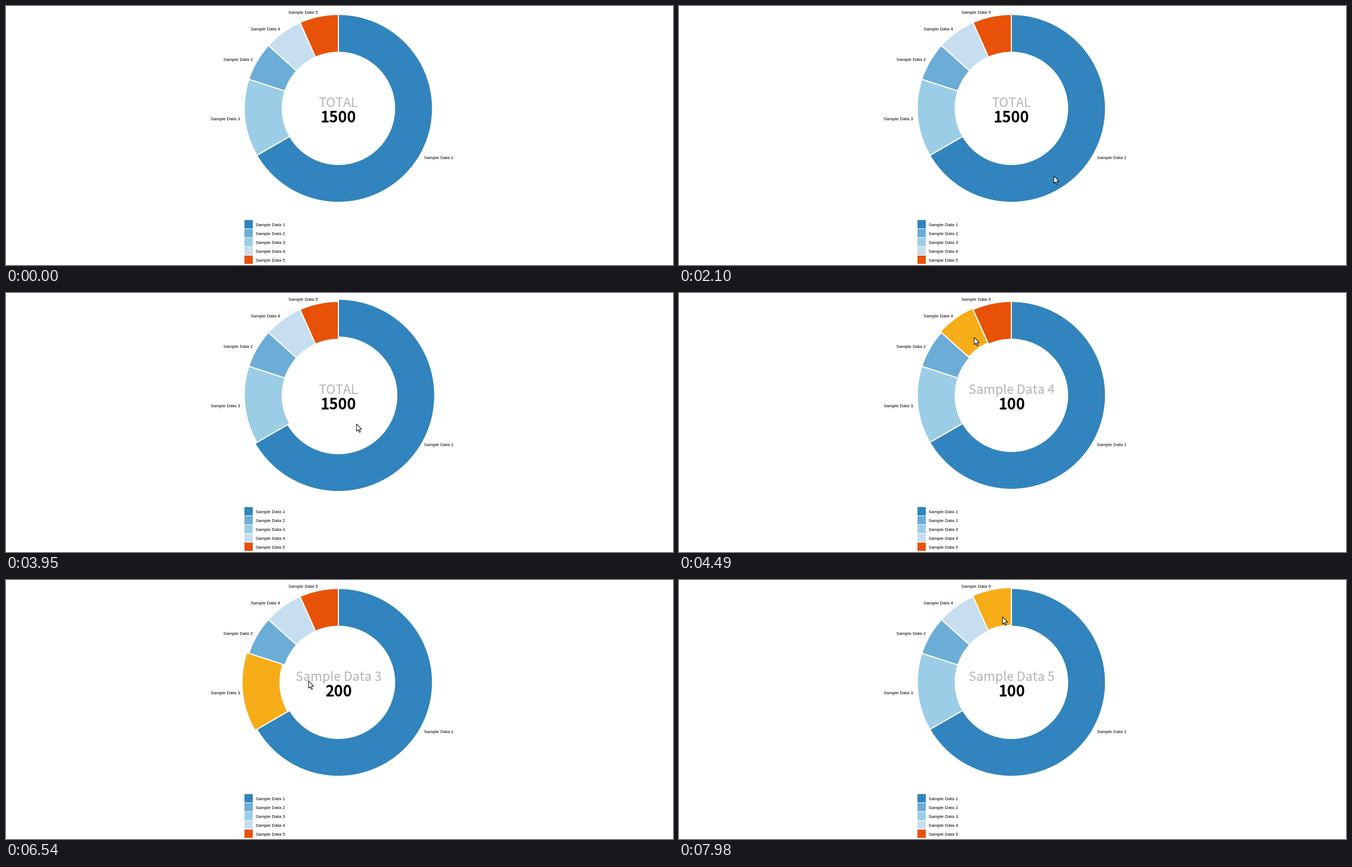
Write a matplotlib script that moves like this. It is 1200 by 467 pixels and loops after 8000 ms.

```python
import math
import numpy as np
import matplotlib.pyplot as plt
from matplotlib.animation import FuncAnimation
from matplotlib.patches import Polygon, Rectangle, Wedge

W, H, DPI = 1200, 467, 100
LOOP, STEP, TICK = 8000, 20, 30
CX, CY = 598, 184.6
OUTER, INNER, LABEL, GROW = 169.4, 101.1, 177.8, 4
LAG = 125                              # hover answers the pointer this late
WINDOW = np.linspace(20, 110, 10)      # a slice swells over this span after it

VALUES = [1000, 100, 200, 100, 100]
COLORS = ["#3184bd", "#6badd6", "#9ccde6", "#c6deef", "#e75208"]
HOVER = "#f7ad18"
TOTAL = sum(VALUES)

# pointer moves: start, end (ms), x, y reached, power of the ease-out
ENTRY = (733.5, 421)
MOVES = [
    (1130, 1490, 707.5, 372, 1),
    (1860, 2310, 669.5, 297, 2.7),
    (3710, 4300, 531, 80, 0.63),
    (4850, 5630, 481, 122.5, 2.7),
    (5670, 5970, 445, 200, 1.5),
    (6300, 6660, 594, 173, 1),
    (7520, 7970, 582, 66.5, 2),
]
ARROW = np.array([(0, 0), (0, 13.2), (3, 10.4), (5.1, 15.2),
                  (7, 14.4), (5, 9.7), (9.2, 9.5)])


def px(size):
    return size * 72 / DPI


def name(i):
    return f"Sample Data {i + 1}"


def layout():
    """Clockwise (start, end) degrees per slice, largest slice first."""
    spans, angle = {}, 0
    for i in sorted(range(len(VALUES)), key=lambda i: -VALUES[i]):
        sweep = 360 * VALUES[i] / TOTAL
        spans[i] = (angle, angle + sweep)
        angle += sweep
    return spans


def pointer_at(t):
    pos = np.array(ENTRY, float)
    for start, end, x, y, power in MOVES:
        if t <= start:
            break
        u = min((t - start) / (end - start), 1)
        pos += (np.array((x, y)) - pos) * (1 - (1 - u) ** power)
    return pos


def hovered(t):
    x, y = pointer_at(t - LAG) - (CX, CY)
    if INNER < math.hypot(x, y) < OUTER:
        angle = math.degrees(math.atan2(x, -y)) % 360
        for i, (a, b) in SPANS.items():
            if a <= angle < b:
                return i
    return None


SPANS = layout()
fig = plt.figure(figsize=(W / DPI, H / DPI), dpi=DPI, facecolor="white")
ax = fig.add_axes([0, 0, 1, 1])
ax.set_xlim(0, W)
ax.set_ylim(H, 0)
ax.axis("off")


def write(x, y, text, size, family="Liberation Sans", **kw):
    return ax.text(x, y, text, fontsize=px(size), family=family,
                   va="baseline", **kw)


wedges = []
for i, color in enumerate(COLORS):
    a, b = SPANS[i]
    wedge = Wedge((CX, CY), OUTER, a - 90, b - 90, width=OUTER - INNER,
                  fc=color, ec="white", lw=px(2))
    wedges.append(ax.add_patch(wedge))
    mid = math.radians((a + b) / 2)
    write(CX + LABEL * math.sin(mid), CY - LABEL * math.cos(mid) + 3, name(i),
          8, ha="left" if mid < math.pi else "right")
    top = 386 + 16 * i
    ax.add_patch(Rectangle((429, top), 15, 15, fc=color, lw=0))
    write(448.7, top + 10.6, name(i), 8)

center = dict(family="Noto Sans CJK JP", ha="center")
title = write(CX, 181.7, "", 22.9, color="#b5b5b5", **center)
number = write(CX + 0.5, 209.5, "", 27.2, weight="bold", **center)
pointer = ax.add_patch(Polygon(ARROW, closed=True, fc="white", ec="black",
                               lw=px(1), zorder=5))


def draw(frame):
    t = frame * STEP + STEP / 2
    begin = max([0] + [move[0] for move in MOVES if move[0] <= t])
    t = begin + (t - begin) // TICK * TICK

    active = hovered(t)
    recent = [hovered(t - d) for d in WINDOW]
    for i, wedge in enumerate(wedges):
        wedge.set_facecolor(HOVER if i == active else COLORS[i])
        wedge.set_radius(OUTER + GROW * recent.count(i) / len(recent))
    title.set_text("TOTAL" if active is None else name(active))
    number.set_text(str(TOTAL if active is None else VALUES[active]))

    pointer.set_visible(t >= MOVES[0][0])
    pointer.set_xy(ARROW + pointer_at(t))
    return [*wedges, title, number, pointer]


anim = FuncAnimation(fig, draw, frames=LOOP // STEP, interval=STEP,
                     repeat=True, repeat_delay=0)
plt.show()
```
